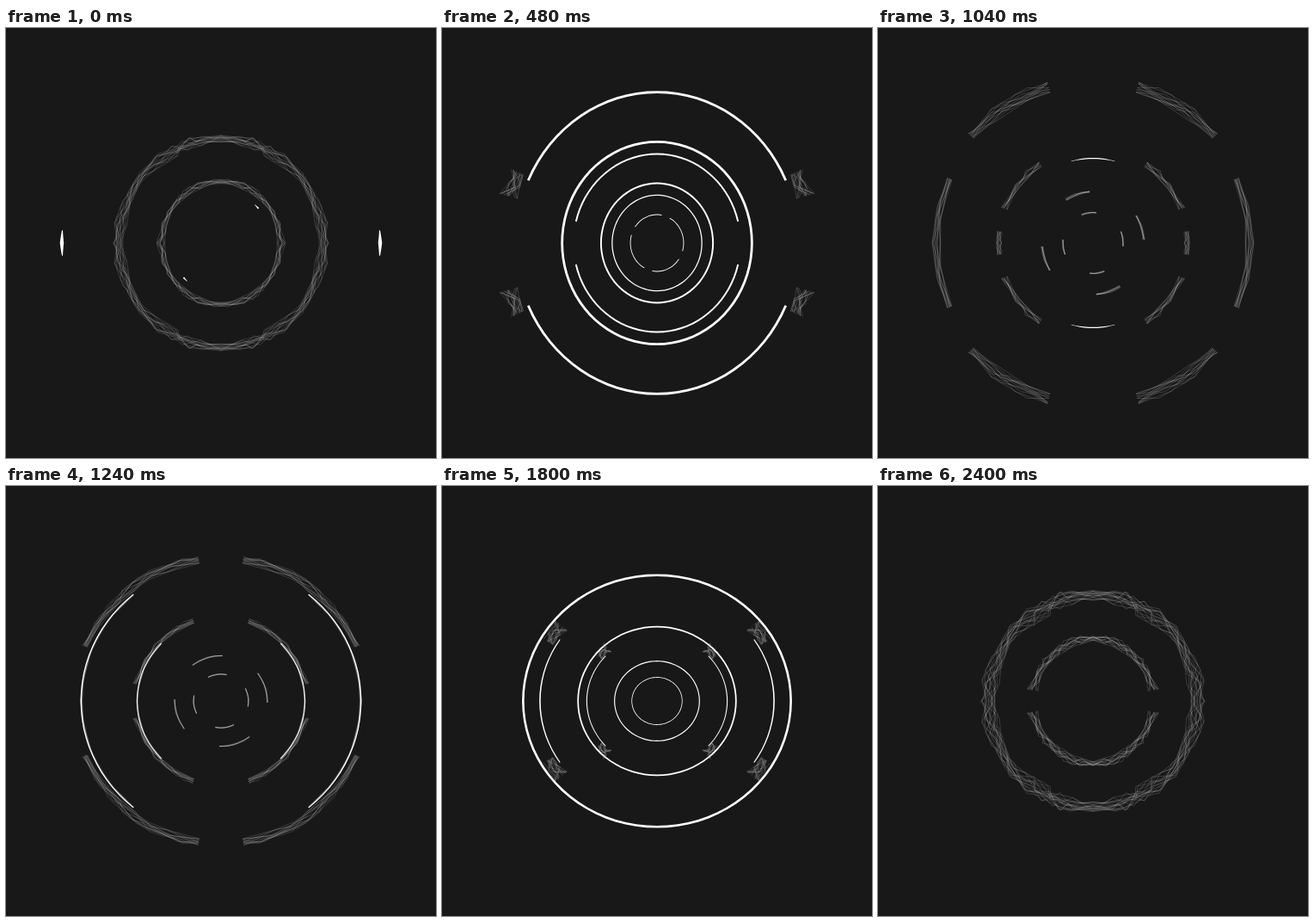
An HTML page with a canvas for the animation above (2440 ms loop, 500 by 500 pixels).

```html
<!DOCTYPE html>
<html lang="en">
<head>
<meta charset="utf-8">
<title>Rings</title>
<style>
  html, body { margin: 0; width: 100%; height: 100%; overflow: hidden; background: #181818; }
  canvas { display: block; width: 500px; height: 500px; }
</style>
</head>
<body>
<canvas id="stage" width="500" height="500"></canvas>
<script>
const ctx = document.getElementById('stage').getContext('2d');
const LOOP = 2440, STEP = 40, ECHO = 0.59;
const MIRROR = [[1, 1], [-1, 1], [1, -1], [-1, -1]];
const HALF_TURN = [[1, 1], [-1, -1]];

// Time, radius, start and end angle of the ring, start and end angle of its echo
const RING = [
  [-30, 188, 0, 0, 0, 0],
  [0, 187, 0, 4.5, 0, 0],
  [480, 170, 24.5, 90, 14, 90],
  [1040, 188, 41, 74, 21, 56],
  [1480, 145, 0, 90, 0, 90],
  [1800, 151, 0, 90, 0, 90],
  [2120, 149, 6, 90, 25, 90],
  [2400, 122, 0, 90, 10, 90],
  [LOOP, 120, 0, 90, 0, 90],
  [3000, 113, 0, 90, 0, 90],
  [3420, 105, 90, 90, 90, 90]];

// Time, radius, end angle of the side crescent and of its echo
const CRESCENT = [
  [600, 184, 0, 0],
  [1040, 183, 24, 7],
  [1480, 134, 84, 90],
  [1800, 132, 34, 43],
  [2120, 129, 5.5, 21],
  [2220, 128, 0, 0]];

const ramp = (t, a, b) => Math.min(1, Math.max(0, (t - a) / (b - a)));
const bump = (t, centre, reach) => Math.max(0, 1 - Math.abs(t - centre) / reach);
const wave = (t, period) => Math.cos(2 * Math.PI * (t - 480) / period);

// Twice per loop the strands gather into a clean line and fray again
const gather = t => 0.5 + 0.5 * wave(t, LOOP / 2);
const lineWeight = t => 2.8 * Math.max(0, 1.25 * gather(t) - 0.25);
const frayWidth = t => 32 * (1 - gather(t)) ** 6;

const noise = i => {
  const v = Math.sin(i * 127.1 + 3.7) * 43758.5453;
  return v - Math.floor(v);
};

function mix(keys, t) {
  const i = keys.findIndex(k => k[0] > t);
  if (i < 1) return null;
  const a = keys[i - 1], b = keys[i], u = ramp(t, a[0], b[0]);
  return a.map((v, n) => v + (b[n] - v) * u);
}

// Point on the slightly breathing ellipse, angle in degrees
function polar(t, r, degrees, offset) {
  const a = degrees * Math.PI / 180, squash = 0.032 * wave(t, LOOP);
  return [(r * (1 - squash) + offset) * Math.cos(a), -(r * (1 + squash) + offset) * Math.sin(a)];
}

function linePath(t, r, from, to, w0, w1) {
  const path = new Path2D(), n = Math.ceil((to - from) / 5) + 2;
  const edge = (i, side) => {
    const u = i / n;
    path.lineTo(...polar(t, r, from + (to - from) * u, side * (w0 + (w1 - w0) * u) / 2));
  };
  for (let i = 0; i <= n; i++) edge(i, 1);
  for (let i = n; i >= 0; i--) edge(i, -1);
  path.closePath();
  return path;
}

function strandPath(t, r, from, to, spread, seed) {
  const path = new Path2D(), strands = 6 + spread * 0.4;
  const n = Math.max(2, Math.round((to - from) / 10));
  for (let s = 0; s < strands; s++) {
    for (let i = 0; i <= n; i++) {
      const id = seed * 1000 + s * 20 + i;
      const shift = i % n ? (noise(id) - 0.5) * 0.9 : 0;
      const angle = from + (to - from) * (i + shift) / n;
      const waist = 0.5 + 0.5 * Math.abs(Math.cos(angle * Math.PI / 60));
      const point = polar(t, r, angle, (noise(id + 500) - 0.5) * spread * waist);
      if (i) path.lineTo(...point); else path.moveTo(...point);
    }
  }
  return path;
}

function arc(fold, { t, r, from, to, w0 = 0, w1 = w0, spread = 0, seed = 1, scale = 1 }) {
  if (to - from < 0.5) return;
  const thin = scale ** 0.7;
  const line = linePath(t, r * scale, from, to, w0 * thin, w1 * thin);
  const strands = spread * scale > 0.3 && strandPath(t, r * scale, from, to, spread * scale, seed);
  for (const [sx, sy] of fold) {
    ctx.setTransform(sx, 0, 0, sy, 250, 250);
    ctx.fill(line);
    if (strands) ctx.stroke(strands);
  }
}

function drawRing(t) {
  const key = mix(RING, t);
  if (!key) return;
  const [, r, ...angles] = key;
  const fresh = 1 - ramp(t, 0, 200);
  const style = { t, r, w0: lineWeight(t) + 4.5 * fresh, w1: lineWeight(t) + fresh };

  [1, ECHO].forEach((scale, i) => {
    const [from, to] = angles.slice(i * 2);
    const spread = frayWidth(t) * (1 - fresh) * Math.min(1, (to - from) / 60);
    arc(MIRROR, { ...style, from, to, spread, scale, seed: i });
  });
  // Loose threads blown off the opening
  arc(MIRROR, { t, r: 186, from: angles[0] - 8, to: angles[0] + 1, spread: 26 * bump(t, 480, 180) });

  // Two small rings, each of two arcs and their half-turn copies
  [0.317, 0.188].forEach((scale, level) => {
    for (let i = 0; i < 2; i++) {
      const born = level * 120 + i * 60 - 30;
      const size = 45 * Math.min(ramp(t, born, born + 450), 0.3 + gather(t), 1 - ramp(t, 1860, 2060));
      const middle = 45 - 0.026 * Math.min(t, 1040) - level * 10 + i * 90;
      arc(HALF_TURN, {
        ...style, scale, from: middle - size, to: middle + size,
        spread: frayWidth(t) * (1 - fresh) * 0.35, seed: 4 + i
      });
    }
  });
}

function drawCrescents(t) {
  const key = mix(CRESCENT, t);
  if (!key) return;
  const [, r, ...ends] = key;
  const outer = mix(RING, t)[1];
  const w0 = (1.6 + 5.4 * bump(t, 1480, 250)) * ramp(t, 1040, 1300);
  [1, 0.6].forEach((scale, i) => {
    const to = ends[i];
    arc(MIRROR, {
      t, r, scale, from: 0, to, w0, w1: Math.min(w0, 1.2),
      spread: frayWidth(t) * 0.35 * (1 - ramp(t, 1100, 1400)), seed: 6
    });
    // Threads tying the tip to the ring outside
    const tie = ramp(t, 1640, 1760) * (1 - ramp(t, 2140, 2240));
    arc(MIRROR, {
      t, r: (r + outer) / 2, scale, from: Math.max(0, to - 4), to: to + 6,
      spread: (outer - r) * 1.4 * tie, seed: 7
    });
  });
}

function drawGlints(t) {
  for (const [time, weight] of [[1040, 1.4], [2120, 4]]) {
    const size = bump(t, time, 100);
    arc(MIRROR, { t, r: 98, from: 90 - 15 * size, to: 90, w0: 0.6, w1: weight });
  }
  const size = 10 * bump(t, 2120, 100);
  arc(HALF_TURN, { t, r: 31, from: -size, to: size, w0: 1.6, w1: 0.8 });
}

function frame(now) {
  const t = Math.floor(now % LOOP / STEP) * STEP;
  ctx.setTransform(1, 0, 0, 1, 0, 0);
  ctx.fillStyle = '#181818';
  ctx.fillRect(0, 0, 500, 500);
  ctx.fillStyle = '#fff';
  ctx.strokeStyle = 'rgba(255, 255, 255, 0.25)';
  ctx.lineWidth = 0.6;
  // A ring outlives its loop, so two generations overlap
  drawRing(t);
  drawRing(t + LOOP);
  drawCrescents(t);
  drawGlints(t);
}

const start = performance.now();
function tick() {
  frame(performance.now() - start);
  requestAnimationFrame(tick);
}
tick();
</script>
</body>
</html>
```
